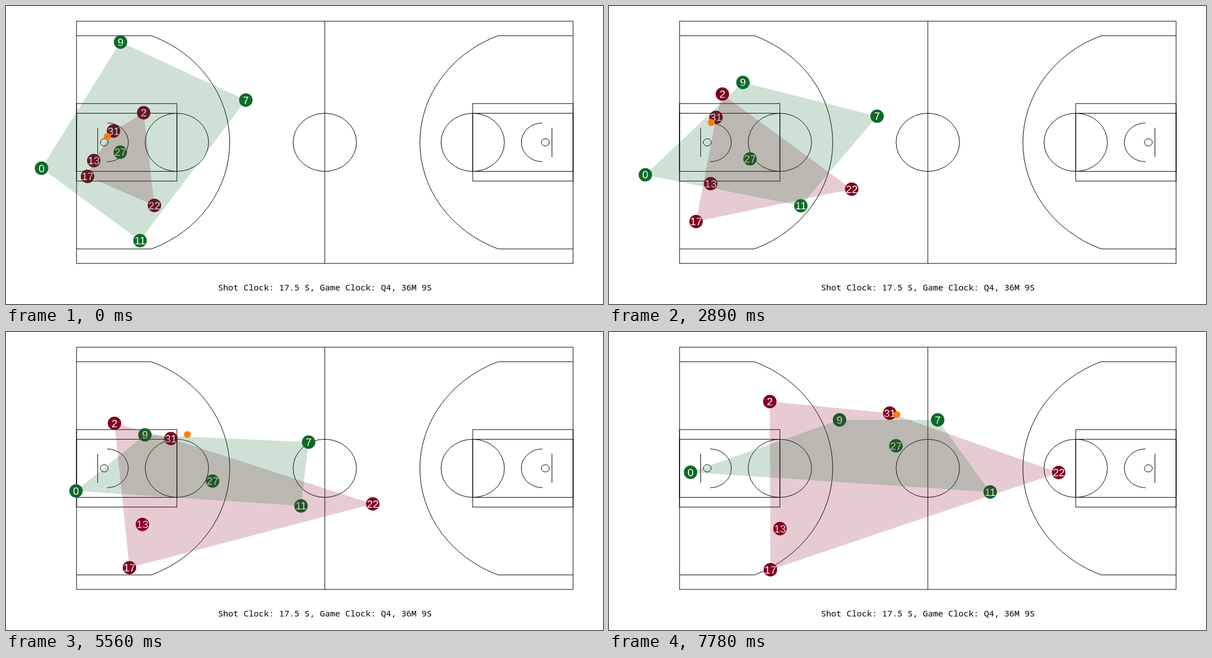
Write an HTML page that moves like this. It is 1058 by 529 pixels and loops after 8 s.

```html
<!DOCTYPE html>
<html lang="en">
<head>
<meta charset="utf-8">
<title>Court movement</title>
<style>
  html, body { margin: 0; width: 100%; height: 100%; overflow: hidden; background: #fff; }
  svg { display: block; width: 1058px; height: 529px; }
  #court { fill: none; stroke: #000; stroke-width: 1; }
  .label { font: 19px "Liberation Sans", Arial, sans-serif; fill: #fff; text-anchor: middle; }
  .clock { font: 15.04px "Noto Sans Mono", monospace; text-anchor: middle; }
  .hull { fill-opacity: .2; }
</style>
</head>
<body>
<svg viewBox="0 0 1058 529">
  <g id="court"></g>
  <g id="players"></g>
  <g id="hulls"></g>
  <circle id="ball" r="6.1" fill="#ff7a00"/>
  <text class="clock" x="565.2" y="505">Shot Clock: 17.5 S, Game Clock: Q4, 36M 9S</text>
</svg>
<script>
const LOOP = 8000, STEPS = 36;
const byId = id => document.getElementById(id);

function add(parent, tag, attrs) {
  const el = document.createElementNS("http://www.w3.org/2000/svg", tag);
  for (const name in attrs) el.setAttribute(name, attrs[name]);
  return parent.appendChild(el);
}

// The court is 94 by 50 feet, drawn from its centre with its own scale per axis.
const CX = 565, CY = 242, FX = 880 / 94, FY = 430 / 50;
const BASE = 47, HOOP = BASE - 5.25, LINE = BASE - 19;

function drawCourt() {
  const court = byId("court");
  const px = ft => CX + ft * FX, py = ft => CY + ft * FY;
  const path = d => add(court, "path", { d });
  const box = (x, y, w, h) => add(court, "rect", { x: px(x), y: py(y), width: w * FX, height: h * FY });
  const ring = (x, r) => add(court, "ellipse", { cx: px(x), cy: CY, rx: r * FX, ry: r * FY });

  box(-BASE, -25, 94, 50);
  path(`M${CX} ${py(-25)}V${py(25)}`);
  ring(0, 6);
  for (const side of [-1, 1]) {
    const sweep = side < 0 ? 1 : 0;
    const arc = (x, y, r) => `${px(side * x)} ${py(-y)}A${r * FX} ${r * FY} 0 0 ${sweep} ${px(side * x)} ${py(y)}`;
    for (const w of [16, 12]) box(side < 0 ? -BASE : LINE, -w / 2, 19, w);
    ring(side * LINE, 6);
    ring(side * HOOP, .75);
    path(`M${px(side * (BASE - 4))} ${py(-3)}V${py(3)}`);
    path("M" + arc(HOOP - .55, 4, 4));
    const corner = HOOP - Math.sqrt(23.75 ** 2 - 22 ** 2);
    path(`M${px(side * BASE)} ${py(-22)}L${arc(corner, 22, 23.75)}H${px(side * BASE)}`);
  }
}

// Key points of each run, reached at these steps.
const BEATS = [0, 9, 22, 35];
const red = {
  2: [[244, 189.5], [218, 156], [177.5, 168.5], [285, 123.5]],
  31: [[190.5, 222], [182.5, 199], [247, 198], [497.5, 144]],
  13: [[155.5, 274.5], [166.5, 303.5], [225, 337.5], [303, 349]],
  17: [[144.5, 302.5], [142.5, 362.5], [201, 413.5], [286, 422]],
  22: [[263, 354], [363.5, 329], [602, 317], [797, 249.5]]
};
const green = {
  9: [[203, 64], [245.5, 111], [217, 182], [408.5, 156]],
  7: [[425, 167], [456.5, 188], [522, 202], [582.5, 156]],
  27: [[202.5, 259.5], [226.5, 265.5], [330, 276], [508.5, 202]],
  0: [[63, 288], [59, 302], [74.5, 296], [112, 289], [144.5, 249]],
  11: [[237.5, 416.5], [292.5, 373], [478, 318], [675.5, 284]]
};
const ballRun = [[179.5, 231.5], [179, 198.5], [223, 219], [321.5, 182], [404, 147.5], [510, 146.5]];

// Smooth curve through values v at steps at, leaving at its final speed.
function spline(at, v, k) {
  const last = at.length - 1;
  const rate = i => (v[i + 1] - v[i]) / (at[i + 1] - at[i]);
  const slope = i => {
    if (i === 0) return 2 * rate(0) - slope(1);
    if (i === last) return rate(last - 1);
    const a = at[i] - at[i - 1], b = at[i + 1] - at[i];
    return (b * rate(i - 1) + a * rate(i)) / (a + b);
  };
  let i = 0;
  while (i < last - 1 && k >= at[i + 1]) i++;
  const h = at[i + 1] - at[i], u = (k - at[i]) / h, w = 1 - u;
  return v[i] * w * w * (1 + 2 * u) + v[i + 1] * u * u * (1 + 2 * w)
    + h * u * w * (w * slope(i) - u * slope(i + 1));
}

const place = (run, k, at = BEATS) => [0, 1].map(axis => spline(at, run.map(p => p[axis]), k));

// Convex hull, monotone chain.
function hull(points) {
  const sorted = [...points].sort((a, b) => a[0] - b[0] || a[1] - b[1]);
  const cross = (o, a, b) => (a[0] - o[0]) * (b[1] - o[1]) - (a[1] - o[1]) * (b[0] - o[0]);
  const chain = list => {
    const out = [];
    for (const p of list) {
      while (out.length > 1 && cross(out.at(-2), out.at(-1), p) <= 0) out.pop();
      out.push(p);
    }
    return out.slice(0, -1);
  };
  return [...chain(sorted), ...chain(sorted.reverse())];
}

function makeTeam(runs, fill, beats = {}) {
  const members = Object.entries(runs).map(([number, run]) => {
    const g = add(byId("players"), "g", {});
    add(g, "circle", { r: 11.9, fill });
    add(g, "text", { class: "label", y: 6.7 }).textContent = number;
    return { g, run, at: beats[number] };
  });
  return { members, area: add(byId("hulls"), "polygon", { class: "hull", fill }) };
}

drawCourt();
const teams = [
  makeTeam(red, "#800020"),
  makeTeam(green, "#0e6a29", { 0: [0, 5, 16, 22, 35] })
];

const move = (el, [x, y]) => el.setAttribute("transform", `translate(${x.toFixed(2)} ${y.toFixed(2)})`);

function draw(k) {
  for (const { members, area } of teams) {
    const spots = members.map(m => place(m.run, k, m.at));
    members.forEach((m, i) => move(m.g, spots[i]));
    area.setAttribute("points", hull(spots).join(" "));
  }
  move(byId("ball"), place(ballRun, k, [0, 9, 20, 25, 30, 35]));
}

let shown = -1;
function tick() {
  // Steps land on 10 ms marks, hence the 5 ms of rounding.
  const k = Math.floor((performance.now() % LOOP + 5) * STEPS / LOOP) % STEPS;
  if (k !== shown) draw(shown = k);
  requestAnimationFrame(tick);
}
tick();
</script>
</body>
</html>
```
